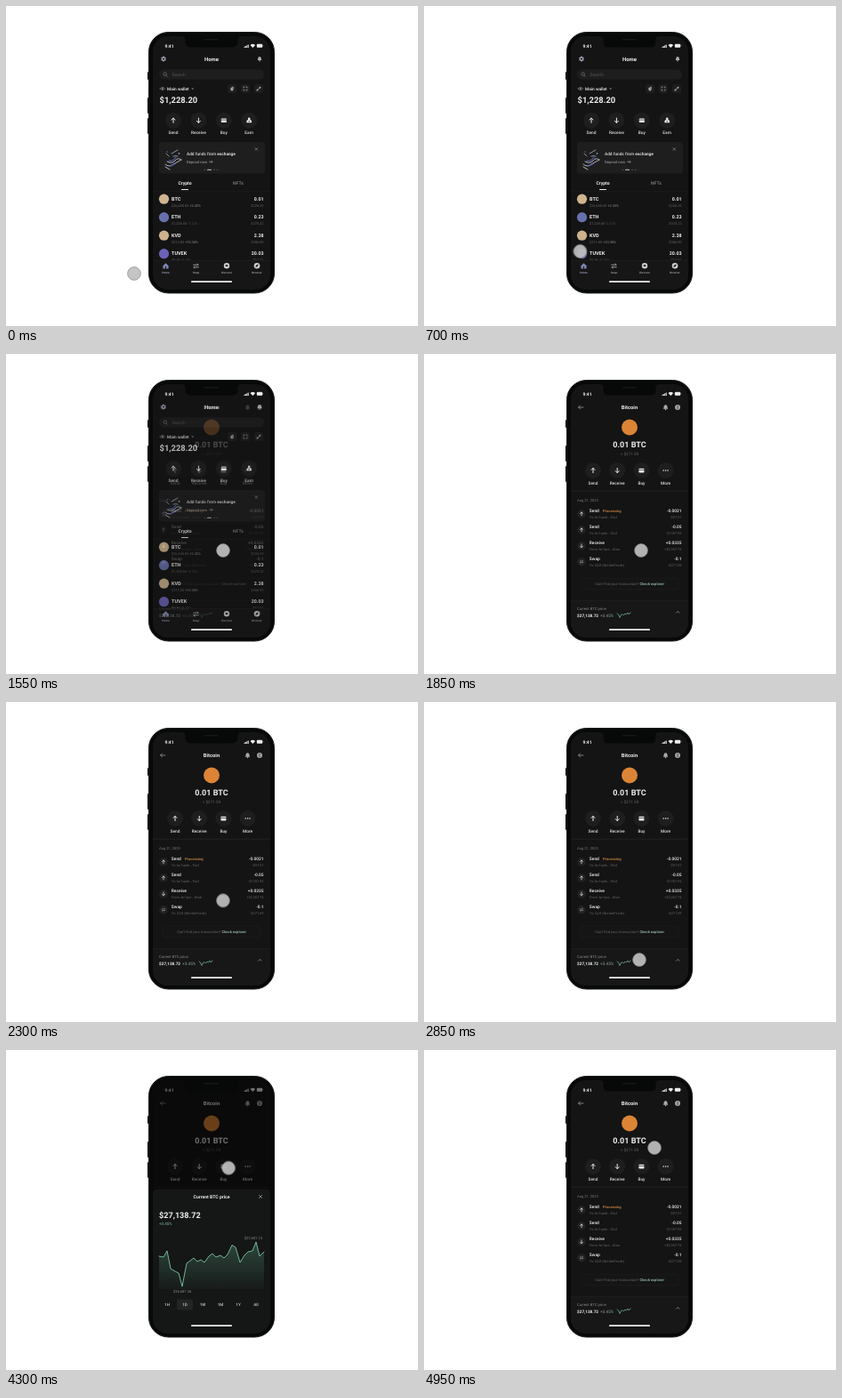
An HTML page that plays this animation: 463x360 px, repeating every 5 s.

```html
<!DOCTYPE html>
<html lang="en">
<head>
<meta charset="utf-8">
<title>Wallet</title>
<style>
html, body { margin: 0; width: 100%; height: 100%; overflow: hidden; background: #fff; }
svg { display: block; width: 463px; height: 360px; }
text { font-family: Roboto, "Liberation Sans", sans-serif; text-rendering: geometricPrecision; }
.ln { fill: none; stroke-linecap: round; stroke-linejoin: round; }
#detail, #dim, #sheet, #cursor, #tap { animation: 5s linear infinite; }
#detail { animation-name: detail; }
#dim { animation-name: dim; }
#sheet { animation-name: sheet; }
#cursor { animation-name: move; }
#tap { animation-name: tap; }
@keyframes detail {
  0%, 30% { opacity: 0; }
  34%, 100% { opacity: 1; }
}
@keyframes dim {
  0%, 60% { opacity: 0; }
  66%, 93% { opacity: .52; }
  98%, 100% { opacity: 0; }
}
@keyframes sheet {
  0%, 60% { transform: translateY(166px); animation-timing-function: cubic-bezier(.25, .6, .3, 1); }
  67%, 93% { transform: none; animation-timing-function: cubic-bezier(.4, 0, .6, 1); }
  98%, 100% { transform: translateY(166px); }
}
@keyframes move {
  0%, 5% { transform: translate(144px, 301px); animation-timing-function: cubic-bezier(.65, 0, .35, 1); }
  26%, 44% { transform: translate(244px, 221px); animation-timing-function: cubic-bezier(.65, 0, .35, 1); }
  55%, 75% { transform: translate(242px, 290px); animation-timing-function: cubic-bezier(.65, 0, .8, .75); }
  86% { transform: translate(250px, 133px); animation-timing-function: cubic-bezier(.2, .6, .4, 1); }
  91%, 100% { transform: translate(259px, 110px); }
}
@keyframes tap {
  0%, 28%, 31%, 57.5%, 60.5%, 91%, 94%, 100% { transform: none; }
  29.5%, 59%, 92.5% { transform: scale(.87); }
}
</style>
</head>
<body>
<svg viewBox="0 0 463 360">
  <defs>
    <clipPath id="screen"><rect x="165" y="34" width="132" height="285" rx="17"/></clipPath>
    <clipPath id="list"><rect x="165" y="209" width="132" height="77"/></clipPath>
    <linearGradient id="fade" x1="0" y1="0" x2="0" y2="1">
      <stop offset="0" stop-color="#5fae8c" stop-opacity=".32"/>
      <stop offset="1" stop-color="#5fae8c" stop-opacity=".03"/>
    </linearGradient>
  </defs>
  <g id="body"></g>
  <g clip-path="url(#screen)">
    <g id="home"></g>
    <g id="detail"></g>
    <g id="status"></g>
    <rect id="dim" x="165" y="34" width="132" height="285"/>
    <g id="sheet"></g>
    <g id="top"></g>
  </g>
  <g id="cursor"><circle id="tap" r="7.4" fill="#c0c0c0" fill-opacity=".92" stroke="#8c8c8c" stroke-width=".7"/></g>
</svg>
<script>
const WHITE = '#eee', GREY = '#646464', GREEN = '#79c5a3', BG = '#141414', PANEL = '#1e1e1f';

const text = (x, y, s, size, fill = WHITE, weight = 400, anchor = 'start') =>
  `<text x="${x}" y="${y}" font-size="${size}" fill="${fill}" font-weight="${weight}" text-anchor="${anchor}">${s}</text>`;
const mid = (x, y, s, size, fill, weight) => text(x, y, s, size, fill, weight, 'middle');
const end = (x, y, s, size, fill, weight) => text(x, y, s, size, fill, weight, 'end');
const box = (x, y, w, h, r, fill, extra = '') =>
  `<rect x="${x}" y="${y}" width="${w}" height="${h}" rx="${r}" fill="${fill}" ${extra}/>`;
const dot = (x, y, r, fill) => `<circle cx="${x}" cy="${y}" r="${r}" fill="${fill}"/>`;
const line = (d, color = WHITE, w = .8) => `<path class="ln" d="${d}" stroke="${color}" stroke-width="${w}"/>`;
const at = (x, y, s, k = 1) => `<g transform="translate(${x} ${y}) scale(${k})">${s}</g>`;
const put = (id, parts) => { document.getElementById(id).innerHTML = parts.flat().join(''); };

const icons = {
  up: line('M0 2.6V-2.6M-2-.6L0-2.6L2-.6', WHITE, 1),
  down: line('M0-2.6V2.6M-2 .6L0 2.6L2 .6', WHITE, 1),
  card: box(-3, -2.2, 6, 4.6, .7, WHITE) + line('M-3-.6H3', PANEL, .7),
  earn: '<path d="M-2.9 2.6Q-3.2-.4-1.2-1H1.2Q3.2-.4 2.9 2.6Z" fill="#eee"/>' + dot(0, -2, 1.3, WHITE) + dot(0, 1, .7, PANEL),
  more: [-2.4, 0, 2.4].map(x => dot(x, 0, .75, WHITE)).join(''),
  swap: line('M-2.4-1.1H2.4L1.2-2.2M2.4 1.1H-2.4L-1.2 2.2', '#aaa', .8),
  bell: '<path d="M-2.8 1.8Q-2 .8-2-.6Q-2-2.8 0-2.8Q2-2.8 2-.6Q2 .8 2.8 1.8Z" fill="#aaa"/>' + dot(0, 2.4, .8, '#aaa'),
  gear: line('M0-2V2M-1.7-1L1.7 1M-1.7 1L1.7-1', '#a2a5b8', 2) + dot(0, 0, 1.1, BG),
  close: line('M-1.6-1.6L1.6 1.6M1.6-1.6L-1.6 1.6', '#aaa', .7),
};

const actions = (names, x0, step, y, labelY) => names.map(([name, icon], i) => {
  const x = x0 + step * i;
  return dot(x, y, 9, PANEL) + at(x, y, icons[icon]) + mid(x, labelY, name, 4.8, '#ddd', 500);
});

put('body', [
  box(159, 74, 3, 9, 1, '#111'), box(159, 103, 3, 18, 1, '#111'), box(159, 126, 3, 18, 1, '#111'),
  box(299, 107, 3, 31, 1, '#111'),
  box(160.5, 29.5, 141, 293.5, 22, '#070808', 'stroke="#1b1e1c" stroke-width="1"'),
]);

const coins = [
  ['BTC', '$26,688.00', '+2.43%', '0.01', '$226.25', '#cfb58e'],
  ['ETH', '$1,228.60', '-2.12%', '0.23', '$375.22', '#6670ad'],
  ['KVD', '$213.80', '+10.38%', '2.38', '$506.95', '#cdb28c'],
  ['TUVEK', '$0.56', '-0.14%', '20.03', '$11.21', '#6a62b8'],
];
const tabs = [['Home', 179.5], ['Swap', 213.5], ['Discover', 248], ['Browser', 282]];

put('home', [
  box(165, 34, 132, 285, 0, BG),
  at(177, 59.5, icons.gear), mid(231, 61.6, 'Home', 6, WHITE, 700), at(285, 59.5, icons.bell, .9),
  box(172, 71.5, 118, 11, 5.5, PANEL),
  '<circle cx="178.7" cy="76.6" r="1.7" fill="none" stroke="#777" stroke-width=".7"/>', line('M180 78L181.2 79.2', '#777', .7),
  text(186.5, 79, 'Search', 5, '#555'),
  line('M173 93Q175.8 89.8 178.6 93Q175.8 96.2 173 93', '#999', .6), dot(175.8, 93, .9, '#999'),
  text(181, 95, 'Main wallet', 4.8, WHITE, 500), '<path d="M208.3 92.4H211.1L209.7 94Z" fill="#999"/>',
  [254, 269, 284].map(x => box(x - 5, 88, 10, 10, 2.5, PANEL)),
  box(252.5, 91.7, 2.8, 3.6, .5, '#aaa'), box(253.9, 90.7, 2, 3, .4, '#888'),
  line('M267 92V91H268M270 91H271V92M271 94V95H270M268 95H267V94', '#aaa', .7),
  line('M282.2 95L285.2 92', '#aaa', .9), dot(285.4, 91.8, 1, '#aaa'), dot(282.5, 94.4, 1, '#aaa'),
  text(172.5, 108.8, '$1,228.20', 9.4, WHITE, 700),
  actions([['Send', 'up'], ['Receive', 'down'], ['Buy', 'card'], ['Earn', 'earn']], 188, 28.4, 128.7, 144),
  box(172, 153, 119, 35.5, 4, PANEL),
  line('M179 178Q183 182 188 178L197 173M181 175Q186 178 190 174Q193 170 197 173M179 181L184 184', '#d5d7e8', .8),
  line('M186 166L193 162M188 169Q191 168 193 169M180 166L183 169', '#bfc3dc', .7),
  line('M183 174Q188 175 191 170M185 180L191 177', '#5660a8', 1.2),
  dot(181, 164, .8, '#5660a8'), dot(194.5, 166, .8, '#d5d7e8'),
  text(203, 168.2, 'Add funds from <tspan font-weight="700">exchange</tspan>', 4.75, '#ddd', 500),
  text(203, 176.7, 'Deposit now', 4.2, '#aaa'), line('M228.4 175.3H232M230.7 174L232 175.3L230.7 176.6', '#aaa', .6),
  at(281.3, 161, icons.close, .8),
  box(222.5, 183.8, 2, 1, .5, '#555'), box(226, 183.8, 5, 1, .5, '#ccc'), box(233, 183.8, 2, 1, .5, '#555'), box(236.5, 183.8, 2, 1, .5, '#555'),
  mid(201, 201.2, 'Crypto', 5.1, WHITE, 700), mid(261, 201.2, 'NFTs', 5.1, '#858585', 500),
  box(197, 206, 8, 1, .5, WHITE), box(165, 208, 132, .4, 0, '#222'),
  '<g clip-path="url(#list)">',
  coins.map(([name, price, change, amount, value, color], i) => at(0, 217 + 20.5 * i,
    dot(177.5, .2, 5.6, color) + text(186, 1.5, name, 5.5, WHITE, 700) +
    text(186, 8.7, `${price} <tspan fill="${change[0] === '+' ? '#929292' : '#505050'}">${change}</tspan>`, 3.9, GREY) +
    end(289.5, 1.5, amount, 5.3, WHITE, 700) + end(289.5, 8.7, value, 3.9, GREY))),
  '</g>',
  box(165, 286, 132, 33, 0, '#161616'), box(165, 286, 132, .4, 0, '#242424'),
  tabs.map(([name, x], i) => mid(x, 300.8, name, 3.1, i ? '#aaa' : '#b8bcdd', 500)),
  '<path d="M176.5 292.2L179.5 289.2L182.5 292.2V295.6H176.5Z" fill="#8288b6"/>', box(178.9, 292.8, 1.2, 2.8, 0, BG),
  at(213.5, 292.5, icons.swap, 1.15),
  dot(248, 292.3, 3.2, '#ccc'), box(246.7, 291.2, 2.6, 1.7, .5, BG),
  dot(282, 292.3, 3.3, '#ccc'), '<path d="M283.8 290.5L282.7 293L280.2 294.1L281.3 291.6Z" fill="#141414"/>',
]);

const moves = [
  ['Send', 'To: bc1qmk...7tzd', '-0.0021', '-$57.51', 'up'],
  ['Send', 'To: bc1qmk...7tzd', '-0.05', '-$1357.93', 'up'],
  ['Receive', 'From: bc1qvr...4hse', '+0.0335', '+$2,367.74', 'down'],
  ['Swap', 'To: QLR (NimbleTrade)', '-0.1', '-$271.59', 'swap'],
];

put('detail', [
  box(165, 34, 132, 285, 0, BG),
  line('M173.6 60H179M175.6 58L173.6 60L175.6 62', '#aaa', .7),
  mid(231, 62.2, 'Bitcoin', 5.8, WHITE, 700),
  at(271.5, 60, icons.bell), dot(285, 60, 3, '#a5a5a5'), box(284.6, 59.5, .8, 2.1, 0, BG), dot(285, 58.4, .5, BG),
  dot(231, 82.5, 9, '#dc8436'),
  mid(231, 104.9, '0.01 BTC', 9, WHITE, 700), mid(231, 113.6, '≈ $271.59', 4.6, GREY),
  actions([['Send', 'up'], ['Receive', 'down'], ['Buy', 'card'], ['More', 'more']], 190, 27.2, 131, 147),
  box(165, 153.8, 132, .8, 0, '#242424'),
  text(172, 166.2, 'Aug 21, 2023', 4.1, '#777'),
  moves.map(([name, note, amount, value, icon], i) => at(0, 179.8 + 18 * i,
    dot(177, 0, 4.8, '#222') + at(177, 0, icons[icon], .72) +
    text(185.8, -1.8, name, 4.9, WHITE, 500) + text(185.8, 4.9, note, 3.9, GREY) +
    (i ? '' : text(201, -1.8, 'Processing', 4.1, '#d18c42', 500)) +
    end(289.5, -1.8, amount, 4.8, WHITE, 500) + end(289.5, 4.9, value, 3.9, GREY))),
  box(176, 252.3, 110, 12.8, 3, '#151515', 'stroke="#202020" stroke-width=".5"'),
  mid(231, 260.1, 'Can\'t find your transaction? <tspan fill="#9cc3b0" font-weight="500">Check explorer</tspan>', 4.1, GREY),
  box(165, 277, 132, 42, 0, '#171717'), box(165, 277, 132, .5, 0, '#222'),
  text(172, 288.2, 'Current BTC price', 4.2, '#8a8a8a'),
  text(172, 295.6, '$27,138.72', 4.7, WHITE, 700), text(198, 295.6, '+3.45%', 4.7, '#8fa89b'),
  line('M217 292L218.5 293L220 296.5L221.5 293.4L223 292.6L224.3 294L226 292L227.5 293L229 291L230.3 293L232 290.8', GREEN, .7),
  line('M283.5 291.2L285.2 289.5L286.9 291.2', '#aaa', .7),
]);

put('status', [
  text(178.6, 47.2, '9:41', 5, WHITE, 700),
  [0, 1, 2, 3].map(i => box(267.5 + 1.4 * i, 45.8 - .8 * i, 1, 1.2 + .8 * i, .2, WHITE)),
  '<path d="M274.5 44Q277.3 41.6 280.1 44L277.3 47Z" fill="#eee"/>',
  box(281.8, 42.8, 6.4, 4, 1, WHITE), box(288.5, 44, .6, 1.5, .2, '#888'),
]);

const pts = [172, 232, 177, 233, 181, 226, 185, 246, 190, 249, 194, 251, 198, 266, 203, 240, 207, 237, 211, 234,
  215, 238, 219, 236, 223, 239, 228, 232, 232, 229, 236, 233, 241, 231, 245, 234, 249, 230, 254, 219.5,
  258, 222, 263, 239, 268, 231, 272, 227, 277, 226, 281, 216, 285, 232, 290, 227];
const curve = 'M' + pts.join(' ');

put('sheet', [
  box(165, 156.5, 132, 175, 5, '#151616'),
  mid(231, 167, 'Current BTC price', 5.1, WHITE, 700), at(286, 165, icons.close),
  text(172, 188.8, '$27,138.72', 9.1, WHITE, 700), text(172, 197.3, '+3.45%', 4.5, GREEN),
  `<path d="${curve}V269H172Z" fill="url(#fade)"/>`, line(curve, GREEN, .9),
  end(288, 213, '$27,651.13', 4.1, '#8a8a8a'), text(188, 272.6, '$26,687.36', 4.1, '#8a8a8a'),
  box(192, 280.5, 18, 12, 2.5, '#232424'),
  ['1H', '1D', '1W', '1M', '1Y', 'All'].map((s, i) => mid(181 + 20 * i, 288.3, s, 4.6, '#ccc', 500)),
]);

put('top', [
  '<path d="M198 34Q201.5 34 201.5 37V40Q201.5 46.5 208 46.5H254Q260.5 46.5 260.5 40V37Q260.5 34 264 34Z" fill="#070808"/>',
  box(223, 37, 16, 1.4, .7, '#161616'),
  box(208, 309.3, 46, 1.7, .85, WHITE),
]);
</script>
</body>
</html>
```
